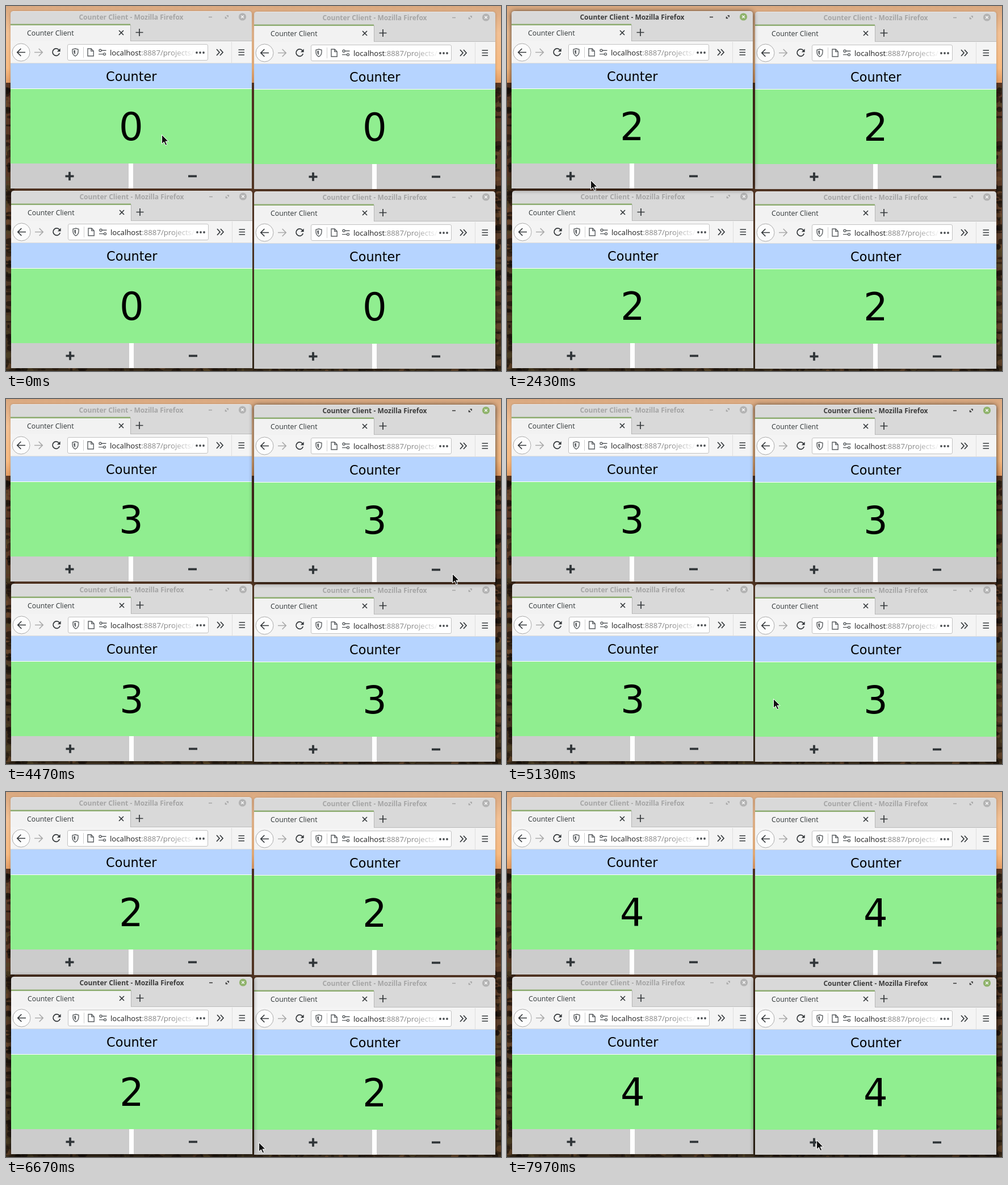
These frames come from a looping animation (872x642 px, 8 s). An HTML page:

```html
<!DOCTYPE html>
<html lang="en">
<head>
<meta charset="utf-8">
<title>Counter Client</title>
<style>
html, body { margin: 0; width: 100%; height: 100%; overflow: hidden; background: #2c2016; }
svg { display: block; width: 872px; height: 642px; }
.ui { font-family: "Open Sans", "Noto Sans", sans-serif; }
.page { font-family: "DejaVu Sans", sans-serif; text-anchor: middle; fill: #000; }
.title { font-size: 12px; font-weight: 700; text-anchor: middle; fill: #a5a5a5; }
.tab { font-size: 12.3px; fill: #2e3436; }
.url { font-size: 13.2px; fill: #1c1c1c; }
.line { fill: none; stroke: #34383b; stroke-width: 1.7; }
.thin { fill: none; stroke: #5b5f62; stroke-width: 1.4; }
.ctl { fill: none; stroke: #a5a5a5; stroke-width: 1.7; }
.close { fill: #b3b3b3; }
.shade { fill: #000; opacity: .22; filter: url(#soft); }
.focus .title { fill: #3a3a3a; }
.focus .ctl { stroke: #333; }
.focus .close { fill: #8fb36b; }
.focus .shade { opacity: .75; filter: url(#deep); }
</style>
</head>
<body>
<svg id="stage" viewBox="0 0 872 642" xmlns="http://www.w3.org/2000/svg">
  <defs>
    <linearGradient id="sky" x1="0" y1="0" x2="0" y2="1">
      <stop offset="0" stop-color="#d9a880"/>
      <stop offset=".35" stop-color="#f3c195"/>
      <stop offset=".8" stop-color="#f8bb82"/>
      <stop offset="1" stop-color="#e39c64"/>
    </linearGradient>
    <linearGradient id="land" x1="0" y1="0" x2="0" y2="1">
      <stop offset="0" stop-color="#573523"/>
      <stop offset=".5" stop-color="#5a3c28"/>
      <stop offset="1" stop-color="#3a2d1c"/>
    </linearGradient>
    <linearGradient id="fade" gradientUnits="userSpaceOnUse" x1="290" y1="0" x2="330" y2="0">
      <stop offset="0" stop-color="#858585"/>
      <stop offset="1" stop-color="#858585" stop-opacity="0.1"/>
    </linearGradient>
    <filter id="soft" x="-10%" y="-10%" width="120%" height="120%"><feGaussianBlur stdDeviation="2.5"/></filter>
    <filter id="deep" x="-10%" y="-10%" width="120%" height="120%"><feGaussianBlur stdDeviation="5"/></filter>
  </defs>
  <rect width="872" height="136" fill="url(#sky)"/>
  <rect y="135" width="872" height="507" fill="url(#land)"/>
  <g id="rocks"></g>
  <g id="windows"></g>
  <path id="pointer" d="M0 0V16.2L3.8 12.6L6.5 18.6L9.2 17.4L6.5 11.6H11.6Z" fill="#111" stroke="#fff" stroke-linejoin="round"/>
</svg>
<script>
const LOOP = 8000;
const $ = id => document.getElementById(id);

// Seeded rocks and grass along the visible edges of the wallpaper
let seed = 7;
const rnd = () => (seed = seed * 16807 % 2147483647) / 2147483647;
const tones = ['#1b120c', '#2a1c11', '#6a482c', '#22190f', '#504326', '#140e09'];
const rock = (x, y) => `<ellipse cx="${x.toFixed(1)}" cy="${y.toFixed(1)}" rx="${(2 + rnd() * 7).toFixed(1)}" ry="${(1.5 + rnd() * 5).toFixed(1)}" fill="${tones[Math.floor(rnd() * tones.length)]}" opacity=".65"/>`;
let rocks = '';
for (let i = 0; i < 90; i++) {
  const y = 146 + rnd() * 490;
  rocks += rock(rnd() * 8, y) + rock(862 + rnd() * 10, y) + rock(rnd() * 872, 636 + rnd() * 8);
}
$('rocks').innerHTML = rocks;

// Small builders for the window art
const box = (x, y, w, h, fill, more = '') => `<rect x="${x}" y="${y}" width="${w}" height="${h}" fill="${fill}" ${more}/>`;
const path = (cls, d) => `<path class="${cls}" d="${d}"/>`;
const rule = (d, colour, width = 1) => `<path d="${d}" stroke="${colour}" stroke-width="${width}"/>`;
const cross = (x, y, r) => `M${x - r} ${y - r}l${2 * r} ${2 * r}m0 ${-2 * r}l${-2 * r} ${2 * r}`;
const plus = (x, y, r) => `M${x - r} ${y}h${2 * r}M${x} ${y - r}v${2 * r}`;
const three = draw => [0, 1, 2].map(draw).join('');

const titleBar = `
  <rect class="shade" x="8" y="10" width="425" height="312" rx="4"/>
  <path d="M8 321V14Q8 9 13 9H428Q433 9 433 14V321Z" fill="#d9d9d9"/>
  ${rule('M12 9.5H429', '#e9e9e9')}
  <text class="title" x="220.5" y="24">Counter Client - Mozilla Firefox</text>
  ${path('ctl', 'M357 19.5H363M388.5 17H391V19.5M386.6 18.8V21.4H389.2')}
  <circle class="close" cx="416.5" cy="19" r="6.6"/>
  ${rule(cross(416.5, 19, 2.3), '#f6f6f6', 1.5)}`;

const tabBar = `
  ${rule('M219 61.5H433', '#bcbcbc')}
  ${box(8, 32, 211, 31, '#f2f2f2')}
  ${box(8, 31.5, 211, 2.5, '#8dac70')}
  ${rule('M219.5 33V62', '#b5b5b5')}
  <text class="tab" x="37" y="52">Counter Client</text>
  ${path('line', cross(203, 47, 4) + plus(235, 46.5, 6.5))}`;

const toolBar = `
  ${box(8, 62, 425, 39, '#f4f4f4')}
  ${rule('M8 100.5H433', '#dcdcdc')}
  <circle cx="26.5" cy="81.5" r="15.5" fill="#fcfcfc" stroke="#aaa"/>
  ${path('line', 'M34 81.5H20M26.3 75L19.8 81.5L26.3 88')}
  <path class="line" style="stroke:#aaa" d="M50 81.5H64M57.7 75L64.2 81.5L57.7 88"/>
  ${path('line', 'M93.2 77.4A6.2 6.2 0 1 0 94.2 83')}
  <path d="M95.6 74.5V80.3H89.8Z" fill="#34383b"/>
  ${box(108.5, 67.5, 247, 28, '#fff', 'rx="2.5" stroke="#c2c2c2"')}
  ${path('thin', 'M122 75L127 76.3V80Q127 85.8 122 88.2Q117 85.8 117 80V76.3Z')}
  <path d="M122 77.6V85.6Q119.2 83.7 119.2 80V78.2Z" fill="#5b5f62"/>
  ${rule('M136.5 72V91', '#d0d0d0')}
  ${path('thin', 'M144 75H150L154.2 79.2V88H144ZM149.8 75V79.4H154.2')}
  ${path('thin', 'M168 78.2a2 2 0 1 0-4 0a2 2 0 1 0 4 0H176.5M171.5 84.6a2 2 0 1 0 4 0a2 2 0 1 0-4 0H163')}
  <text class="url" x="183" y="86.5">localhost<tspan fill="url(#fade)">:8887/projects/</tspan></text>
  ${box(331, 70, 23, 23, '#fff')}
  ${three(i => `<circle cx="${336 + 6 * i}" cy="82" r="1.9" fill="#4c5053"/>`)}
  ${path('line', 'M371 76L376 81.5L371 87M377 76L382 81.5L377 87')}
  ${rule('M397.5 63V100', '#dedede')}
  ${path('line', three(i => `M409.5 ${77 + 4.5 * i}H420`))}`;

const page = `
  ${box(8, 101, 425, 220, '#fff')}
  ${box(8, 101, 425, 44, '#b6d4ff')}
  ${box(8, 146, 425, 131, '#90ee90')}
  ${box(8, 277, 208, 44, '#ccc')}
  ${box(224, 277, 209, 44, '#ccc')}
  <text class="page" x="220.8" y="132" font-size="22.4">Counter</text>
  <text class="page count" x="220.3" y="235.6" font-size="67.2">0</text>
  ${rule(plus(112, 299.3, 7.5) + 'M321 299.3h15', '#303538', 3.8)}`;

// Two by two grid of windows, numbered row by row
const wins = [0, 1, 2, 3].map(i => {
  const col = i % 2, row = i >> 1;
  const g = document.createElementNS('http://www.w3.org/2000/svg', 'g');
  g.setAttribute('transform', `translate(${429 * col + row * (1 - col)} ${316 * row + col})`);
  g.innerHTML = `<g class="ui">${titleBar}${tabBar}${toolBar}</g>${page}`;
  return g;
});
const digits = wins.map(w => w.querySelector('.count'));

// Each click focuses its window at once; the shared count follows after LAG
const LAG = 110;
const click = (at, win, step) => ({ at, win, step });
const clicks = [
  click(1620, 0, 1), click(2320, 0, 1), click(2820, 0, 1), click(3220, 0, 1),
  click(4120, 1, -1), click(6260, 2, -1), click(7190, 3, 1), click(7590, 3, 1)
];

// Pointer glides: start, end, destination and downward bend
const home = { x: 274, y: 226 };
const glide = (from, to, x, y, bend = 0) => ({ from, to, x, y, bend });
const glides = [
  glide(110, 830, 304, 299), glide(1469, 1470, 147, 306), glide(3500, 3830, 797, 311, 14),
  glide(4330, 4570, 783, 306), glide(4900, 5400, 301, 612, 24),
  glide(5400, 5730, 351, 620), glide(6500, 7030, 545, 612)
];

function pointerAt(t) {
  let { x, y } = home;
  for (const g of glides) {
    if (t < g.from) break;
    const u = Math.min(1, (t - g.from) / (g.to - g.from));
    const k = 1 - (1 - u) ** 1.7;
    x += (g.x - x) * k;
    y += (g.y - y) * k + g.bend * Math.sin(Math.PI * k);
  }
  return [Math.round(x) + .5, Math.round(y) + .5];
}

let shown;
function render(t) {
  const done = clicks.filter(c => t >= c.at);
  const count = done.filter(c => t >= c.at + LAG).reduce((sum, c) => sum + c.step, 0);
  const focus = done.length ? done[done.length - 1].win : -1;
  const state = focus + ':' + count;
  if (state !== shown) {
    const order = [3, 2, 1, 0, ...done.map(c => c.win)];
    order.forEach(i => $('windows').appendChild(wins[i]));
    wins.forEach((w, i) => w.setAttribute('class', i === focus ? 'focus' : ''));
    digits.forEach(d => { d.textContent = count; });
    shown = state;
  }
  $('pointer').setAttribute('transform', `translate(${pointerAt(t)})`);
}

const start = performance.now();
function tick() {
  render((performance.now() - start) % LOOP);
  requestAnimationFrame(tick);
}
tick();
</script>
</body>
</html>
```
